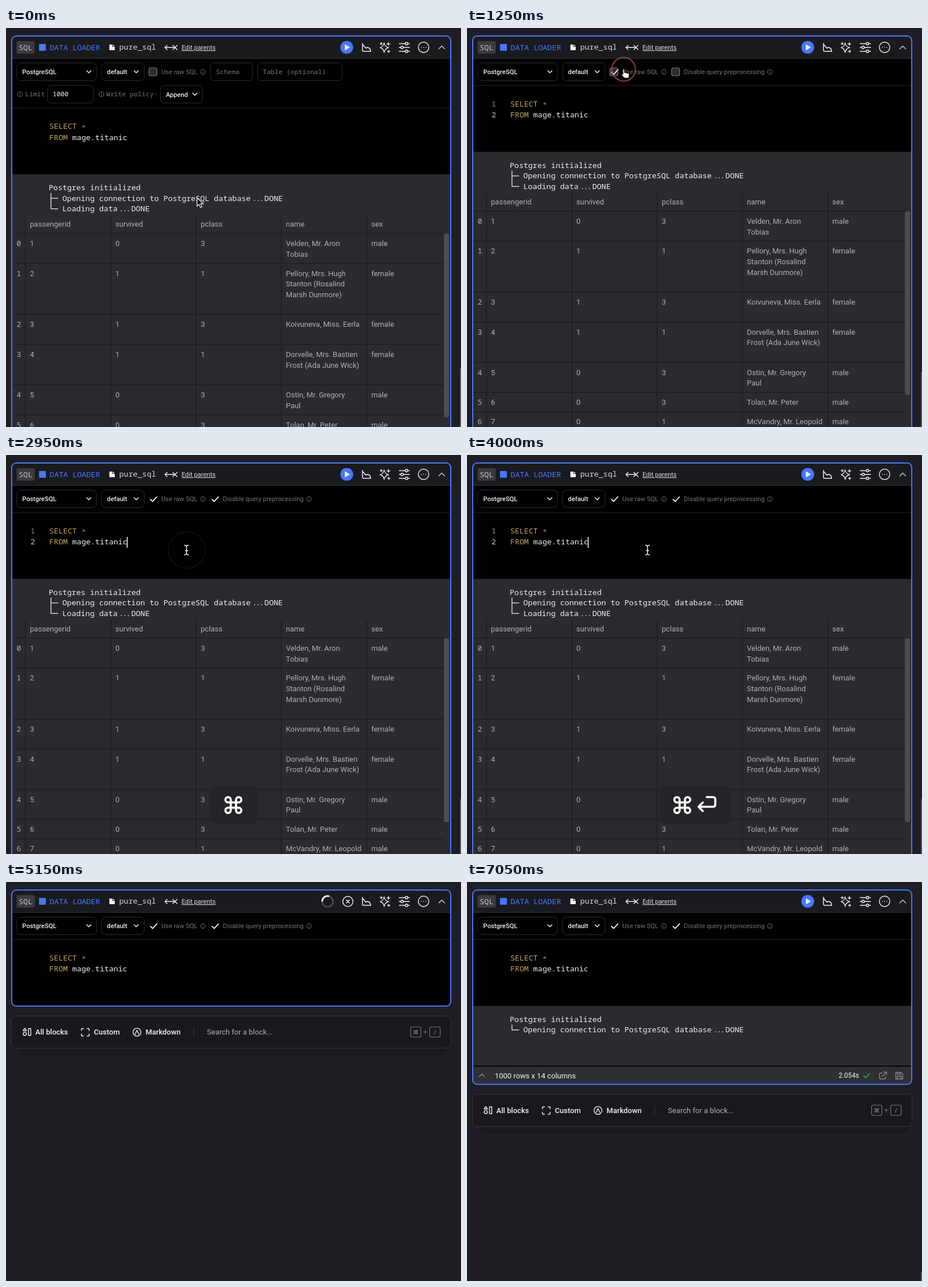
These frames come from a looping animation (799 px wide and 701 px high, 7.2 s). An HTML page:

```html
<!DOCTYPE html>
<html lang="en">
<head>
<meta charset="utf-8">
<title>SQL block</title>
<style>
html, body { margin: 0; width: 100%; height: 100%; overflow: hidden; background: #1f1e24; }
svg { display: block; width: 100%; height: 100%; }
text { font: 13.1px Roboto, sans-serif; white-space: pre; }
.m { font: 13.44px "Noto Sans Mono", monospace; }
.ms { font: 11.55px "Noto Sans Mono", monospace; }
.s { font-size: 11.28px; }
.b { font-weight: 500; }
.i { fill: none; stroke-linecap: round; stroke-linejoin: round; }
</style>
</head>
<body>
<svg id="stage" viewBox="0 0 799 701"></svg>
<script>
const LOOP = 7200, STEP = 50, SHIFT = 39.3, TOP = 14;
const BLUE = '#4877ff', GOLD = '#c9a45c', GREY = '#75757b', SOFT = '#b1b1b7', WHITE = '#f2f2f4';

const txt = (x, y, s, fill = WHITE, cls = '', more = '') =>
  `<text x="${x}" y="${y}" fill="${fill}" class="${cls}" ${more}>${s}</text>`;
const box = (x, y, w, h, fill, rx = 0, stroke = 'none', sw = 1) =>
  `<rect x="${x}" y="${y}" width="${w}" height="${h}" rx="${rx}" fill="${fill}" stroke="${stroke}" stroke-width="${sw}"/>`;
const icon = (d, stroke = WHITE, sw = 1.5, more = '') =>
  `<path class="i" d="${d}" stroke="${stroke}" stroke-width="${sw}" ${more}/>`;
const ring = (x, y, r, stroke, sw = 1.4, more = '') =>
  `<circle cx="${x}" cy="${y}" r="${r}" fill="none" stroke="${stroke}" stroke-width="${sw}" ${more}/>`;
const group = (id, body) => `<g id="${id}">${body}</g>`;

const info = (x, y) => ring(x, y, 4.2, GREY, 1) + icon(`M${x} ${y}v2M${x} ${y - 2}v.1`, GREY, 1);
const field = (x, y, w) => box(x, y, w, 31, '#000', 7, '#2b2b30');
const chevron = (x, y) => icon(`M${x - 3.7} ${y - 2}l3.7 3.8 3.7-3.8`);
const tick = x => icon(`M${x} 78l3.6 3.6 7.4-8`, WHITE, 1.8);
const check = x => box(x, 70, 14, 14, '#2c2c31', 3, '#77777c', 1.2);
const COMMAND = 'M15 6v12a3 3 0 1 0 3-3H6a3 3 0 1 0 3 3V6a3 3 0 1 0-3 3h12a3 3 0 1 0-3-3';
const command = (x, y, k, stroke, sw) =>
  icon(COMMAND, stroke, sw, `transform="translate(${x} ${y}) scale(${k}) translate(-12 -12)"`);

function header() {
  return box(10, TOP, 771, 60, '#1a1b20', 8) + box(11, 53, 769, 50, '#000') + box(11, 53, 769, 1, '#303036') +
    box(18.5, 23, 32, 22, '#3a3b3f', 3) + txt(22.3, 38.5, 'SQL', '#c4c4c8', 'm') +
    box(58, 28, 12, 12, BLUE, 1) + txt(76.6, 38.5, 'DATA LOADER', BLUE, 'm') +
    '<path d="M182 29h4.500v4h4.500v5a1 1 0 0 1-1 1h-7.500a1 1 0 0 1-1-1v-8zM187.500 29l3.500 3h-3.500z" fill="#f2f2f4"/>' +
    txt(198.8, 38.3, 'pure_sql', '#d8d8dc', 'm') +
    icon('M283 30.500l-4 3.700 4 3.700M279.500 34.200h17M293 30.500l7.500 7.500M300.500 30.500l-7.500 7.500', WHITE, 1.4) +
    txt(308.3, 38.1, 'Edit parents', '#dcdce0', 's', 'text-decoration="underline"') +
    icon('M626 27v12a2 2 0 0 0 2 2h12.500l-1.500-5-4-2-3 1.500-6-7') +
    icon('M664 26q1 7 8 8.500-7 1.500-8 8.500-1-7-7-8.500 6-1.500 7-8.500zM671.500 25.500v5M669 28h5M672 39v4M670 41h4M659 25.500v4M657 27.500h4', WHITE, 1.3) +
    icon('M690.500 27.500h10M706 27.500h2.500M690.500 34.200h2.500M698 34.200h10.500M690.500 41h10M706 41h2.500') +
    ring(703.3, 27.5, 2.2, WHITE) + ring(695.5, 34.2, 2.2, WHITE) + ring(703.3, 41, 2.2, WHITE) +
    ring(733.3, 34, 9.2, WHITE) + icon('M729.500 34h.1M733.300 34h.1M737.100 34h.1') +
    icon('M760 36.700l5.200-5 5.200 5', '#c8c8cc') +
    group('play', `<circle cx="598.4" cy="34" r="11.3" fill="${BLUE}"/><path d="M595 28.500l8.800 5.500-8.800 5.500z" fill="#f2f2f4"/>`) +
    group('busy', ring(564.7, 34.2, 9.6, '#4a4a50', 2.8) +
      ring(564.7, 34.2, 9.6, '#f4f4f4', 2.8, 'id="arc" pathLength="100" stroke-dasharray="30 100"') +
      ring(600.3, 34.2, 8.9, WHITE) + icon('M597.700 31.600l5.200 5.200M602.900 31.600l-5.200 5.200'));
}

function options() {
  return box(11, 54, 769, 90, '#000') +
    field(19, 61.5, 140) + txt(28.5, 81, 'PostgreSQL', WHITE, 's b') + chevron(145.5, 77) +
    field(167.8, 61.5, 75) + txt(177.3, 81, 'default', WHITE, 's b') + chevron(228.7, 77) +
    txt(272.8, 81.1, 'Use raw SQL', GREY, 's') + info(345.7, 77.3) +
    group('box1', check(251)) + group('tick1', tick(253.8)) +
    group('wide', field(359, 61.5, 74) + txt(368.7, 80.6, 'Schema', '#77777d', 'ms') +
      field(441.5, 61.5, 149) + txt(451, 80.6, 'Table (optional)', '#77777d', 'ms') +
      info(24.3, 116.6) + txt(33.8, 120.3, 'Limit', GREY, 'ms') + field(72.5, 100.8, 81.5) + txt(82, 120.2, '1000', WHITE, 'ms') +
      info(167.5, 116.6) + txt(176, 120.3, 'Write policy:', GREY, 'ms') +
      field(271.3, 100.8, 73.7) + txt(280.7, 120.5, 'Append', WHITE, 's b') + chevron(331.5, 116.5)) +
    group('raw', group('box2', check(359.3)) + group('tick2', tick(362)) +
      txt(380.8, 81.1, 'Disable query preprocessing', GREY, 's') + info(532, 77.3));
}

const editor = () => box(11, 100.5, 769, 1, '#232328') +
  group('nums', txt(43, 137.5, '1', '#8b8b90', 'm') + txt(43, 157.3, '2', '#c6c6ca', 'm')) +
  txt(76, 137.5, 'SELECT', GOLD, 'm') + txt(132.4, 140.3, '*', '#8a8a8e', 'm') +
  txt(76, 157.3, 'FROM', GOLD, 'm') + txt(116.3, 157.3, 'mage.titanic', WHITE, 'm') +
  group('caret', box(212, 144, 1.5, 19, '#fff')) + group('secs', txt(75, 205, '1s', '#77777c', 'm'));

function logLine(y, s) {
  const end = 99 + s.length * 8.064;
  return txt(99, y, s, WHITE, 'm') + txt(end + 2.8, y, '...', WHITE, 'm', 'letter-spacing="-2"') +
    txt(end + 24.2, y, 'DONE', WHITE, 'm');
}
const opening = () => txt(75, 245.6, 'Postgres initialized', WHITE, 'm') +
  logLine(264.4, 'Opening connection to PostgreSQL database');

// height, survived, class, sex, name lines
const ROWS = [
  [52.5, 0, 3, 'male', 'Velden, Mr. Aron', 'Tobias'],
  [89.8, 1, 1, 'female', 'Pellory, Mrs. Hugh', 'Stanton (Rosalind', 'Marsh Dunmore)'],
  [52.5, 1, 3, 'female', 'Koivuneva, Miss. Eerla'],
  [71, 1, 1, 'female', 'Dorvelle, Mrs. Bastien', 'Frost (Ada June Wick)'],
  [52.7, 0, 3, 'male', 'Ostin, Mr. Gregory', 'Paul'],
  [33.8, 0, 3, 'male', 'Tolan, Mr. Peter'],
  [52.5, 0, 1, 'male', 'McVandry, Mr. Leopold', 'Jon']
];

function table() {
  const cols = [42, 192, 342, 491.5, 641.5], heads = ['passengerid', 'survived', 'pclass', 'name', 'sex'];
  let s = heads.map((h, i) => txt(cols[i], 310.2, h, SOFT)).join('');
  let y = 321.8;
  ROWS.forEach(([h, survived, cls, sex, ...name], n) => {
    const base = y + 22;
    s += box(11, y - .6, 758, 1.2, '#1c1c20') + txt(18.6, base, n, SOFT, 'm');
    [n + 1, survived, cls, , sex].forEach((v, i) => { s += txt(cols[i], base, v, SOFT); });
    name.forEach((part, k) => { s += txt(cols[3], base + k * 18.7, part, SOFT); });
    y += h;
  });
  cols.forEach(x => { s += box(x - 8.6, 290, 1.2, 420, '#1c1c20'); });
  return s + box(769, 322, 9, 323, '#4d4d52', 4);
}

const output = () => box(11, 217.6, 769, 500, '#2a2a2f') + opening() + logLine(283.2, 'Loading data') +
  icon('M79 251v27.400h12M79 259.800h12', WHITE, 1.3) + table();

const result = () => box(11, 217.6, 769, 105, '#2a2a2f') + opening() + icon('M79 251v8.800h12', WHITE, 1.3);

const status = () => '<path d="M11 0h769v23q0 8-8 8H19q-8 0-8-8z" fill="#2e3035"/>' + box(11, 0, 769, 1, '#1b1b1f') +
  icon('M21.500 18l4.700-4.700 4.700 4.700', '#8b8b90') + txt(48.8, 20.6, '1000 rows x 14 columns') +
  group('took', txt(652.5, 20, '2.054s', WHITE, '', 'style="font-size:11.900px"')) +
  icon('M696.500 16.500l3.500 3.500 7-7.500', '#2fb62a', 1.6) +
  icon('M729 11.500h-2.500a2 2 0 0 0-2 2v6.500a2 2 0 0 0 2 2h6.500a2 2 0 0 0 2-2v-2.500M729 17.500l7.500-7.500M732 10h4.700v4.700', '#8b8b90', 1.4) +
  icon('M753 10.500h9l3 3v8.500h-12zM756 10.500v3.500h5v-3.500M755.500 22v-4.500h7v4.500', '#8b8b90', 1.3);

const search = () => '<rect x="22" y="30" width="752" height="40" rx="12" fill="#1a191f"/>' +
  box(9.5, .5, 772, 56.5, '#18181d', 8, '#36363c') +
  ring(33, 31.7, 2.8, WHITE) + icon('M33 22l3 4.200h-6zM39.500 22.500h4v12h-4z', WHITE, 1.4) + txt(51.5, 33.2, 'All blocks', WHITE, 'b') +
  icon('M132.500 26v-2.500a1 1 0 0 1 1-1h2.500M142.500 22.500h2.500a1 1 0 0 1 1 1v2.500M146 32v2.500a1 1 0 0 1-1 1h-2.500M136 35.500h-2.500a1 1 0 0 1-1-1v-2.500') +
  txt(154.2, 33.2, 'Custom', WHITE, 'b') +
  ring(230, 28.8, 6.9, WHITE) + icon('M226.800 32.500l3.200-7 3.200 7', WHITE, 1.4) + txt(245, 33.2, 'Markdown', WHITE, 'b') +
  box(329, 21, 1, 15, '#3a3a40') + txt(352.8, 33.2, 'Search for a block...', SOFT) +
  box(710.5, 19.5, 18, 18, 'none', 3, '#77777c', 1.2) + command(719.5, 28.7, .4, '#8b8b90', 2.4) +
  icon('M733 28.500h6.500M736.200 25.300v6.500', '#77777c', 1) +
  box(744, 19.5, 18.5, 18, 'none', 3, '#77777c', 1.2) + icon('M754.800 25.500l-3 6.500', '#8b8b90', 1);

const keys = () => group('one', box(359, 582, 83, 66, '#242529', 10) + command(399.3, 615, 1.55, '#fff', 2.4)) +
  group('two', box(338, 582, 125, 66, '#242529', 10) + command(378, 615, 1.55, '#fff', 2.4) +
    icon('M421 601h11q4 0 4 4v9q0 4-4 4h-25M414 610.500l-7.500 7.500 7.500 7.500', '#fff', 3.7));

const BEAM = 'M-3.500-8.500q3.500 0 3.500 3v11q0 3-3.500 3M3.500-8.500q-3.500 0-3.500 3M0 5.500q0 3 3.500 3M-2 1h4';
const pointers = () =>
  '<path id="arrow" d="M0 0v14.500l3.500-3.200 2.400 5.500 2.700-1.200-2.400-5.300h4.800z" fill="#000" stroke="#fff" stroke-width="1.200"/>' +
  group('beam', icon(BEAM, '#000', 3.4) + icon(BEAM, '#fff', 1.4)) +
  '<path id="hand" d="M-1 .500q1.200-1.800 2.700 0v5.200l6.200 1.300q2.200.600 1.800 3l-.900 5.500h-7.300l-4.800-5.600q-.400-2 1.600-1.400l.700.600z" fill="#fff" stroke="#111" stroke-width="1"/>';

const stage = document.getElementById('stage');
stage.innerHTML = box(0, 0, 799, 701, '#1f1e24') + group('finder', search()) +
  `<rect id="card" x="10" y="${TOP}" width="771" rx="8" fill="#000"/>` + header() +
  options() + group('editor', editor()) + group('output', output()) + group('result', result()) + group('status', status()) +
  `<rect id="edge" x="10" y="${TOP}" width="771" rx="8" fill="none" stroke="${BLUE}" stroke-width="2"/>` +
  '<rect id="page" x="797" width="4" height="120" rx="2" fill="#4d4d52"/>' +
  group('keys', keys()) + ring(0, 0, 0, '#c04a55', 2.8, 'id="ripple"') + group('pointer', pointers());

const el = {};
stage.querySelectorAll('[id]').forEach(n => { el[n.id] = n; });
const show = (id, on) => el[id].setAttribute('display', on ? 'inline' : 'none');
const set = (id, attrs) => { for (const k in attrs) el[id].setAttribute(k, attrs[k]); };
const move = (id, x, y) => set(id, { transform: `translate(${x} ${y})` });

// time, x, y
const PATH = [[0, 335.5, 298.5], [450, 335.5, 298.5], [1100, 275, 72.5], [1400, 275, 72.5], [1800, 372, 75],
  [2000, 372, 75], [2350, 317, 167], [4000, 317, 167], [4650, 396, 725], [LOOP, 396, 725]];
const CLICKS = [1150, 1900, 2700];

function pointerAt(t) {
  const i = PATH.findIndex(p => p[0] > t), [t0, x0, y0] = PATH[i - 1], [t1, x1, y1] = PATH[i];
  const u = (t - t0) / (t1 - t0), e = u * u * (3 - 2 * u);
  return [x0 + (x1 - x0) * e, y0 + (y1 - y0) * e];
}

function render(ms) {
  const t = Math.floor(ms % LOOP / STEP) * STEP;
  const wide = t < 1200, running = t >= 4750 && t < 6900, bar = t >= 5850, done = t >= 6800;
  const dy = wide ? SHIFT : 0;

  show('wide', wide);
  show('raw', !wide);
  show('box1', t < 1400);
  show('tick1', !wide);
  show('box2', t < 2150);
  show('tick2', t >= 1950);
  move('editor', 0, dy);
  show('nums', t >= 700 && t < 4750);
  show('caret', t >= 2650 && t < 4150 && Math.floor((t - 2650) / 500) % 2 === 0);
  show('secs', t >= 5750 && running);

  show('play', !running);
  show('busy', running);
  const spin = t < 6350 ? t : t < 6550 ? 6350 : 6550;
  set('arc', { transform: `rotate(${180 + (spin - 5150) * 585 / 1400} 564.7 34.2)` });

  const bottom = t < 4750 ? 760 : done ? 355.5 : bar ? 249 : 218;
  set('card', { height: bottom - TOP });
  set('edge', { height: bottom - TOP });
  show('output', t < 4750);
  move('output', 0, dy);
  show('result', done);
  show('status', bar);
  move('status', 0, bottom - 31.5);
  show('took', t >= 6900);
  show('finder', t >= 4750);
  move('finder', 0, bottom + 17);
  show('page', t < 4750 || done);
  set('page', { y: wide ? 597 : done ? 685 : 604 });

  show('keys', t >= 2900 && t < 4450);
  set('keys', { opacity: t < 4000 ? 1 : Math.max(0, 1 - (t - 4000) / 450) });
  show('one', t < 3300);
  show('two', t >= 3300);

  const [x, y] = pointerAt(t);
  const inEditor = y > 101 + dy && y < 217 + dy, onCheck = y > 62 && y < 94 && x > 250;
  move('pointer', x, y);
  show('beam', inEditor);
  show('hand', onCheck);
  show('arrow', !inEditor && !onCheck);

  const click = CLICKS.find(c => t >= c && t < c + 300);
  show('ripple', click !== undefined);
  if (click !== undefined) {
    const u = (t - click) / 300;
    set('ripple', { cx: x, cy: y, r: 32.5 * (1 - (1 - u) ** 2.5), opacity: 1 - u, 'stroke-width': 3.4 - 2.6 * u });
  }
}

const start = performance.now();
function tickFrame() {
  render(performance.now() - start);
  requestAnimationFrame(tickFrame);
}
tickFrame();
</script>
</body>
</html>
```
